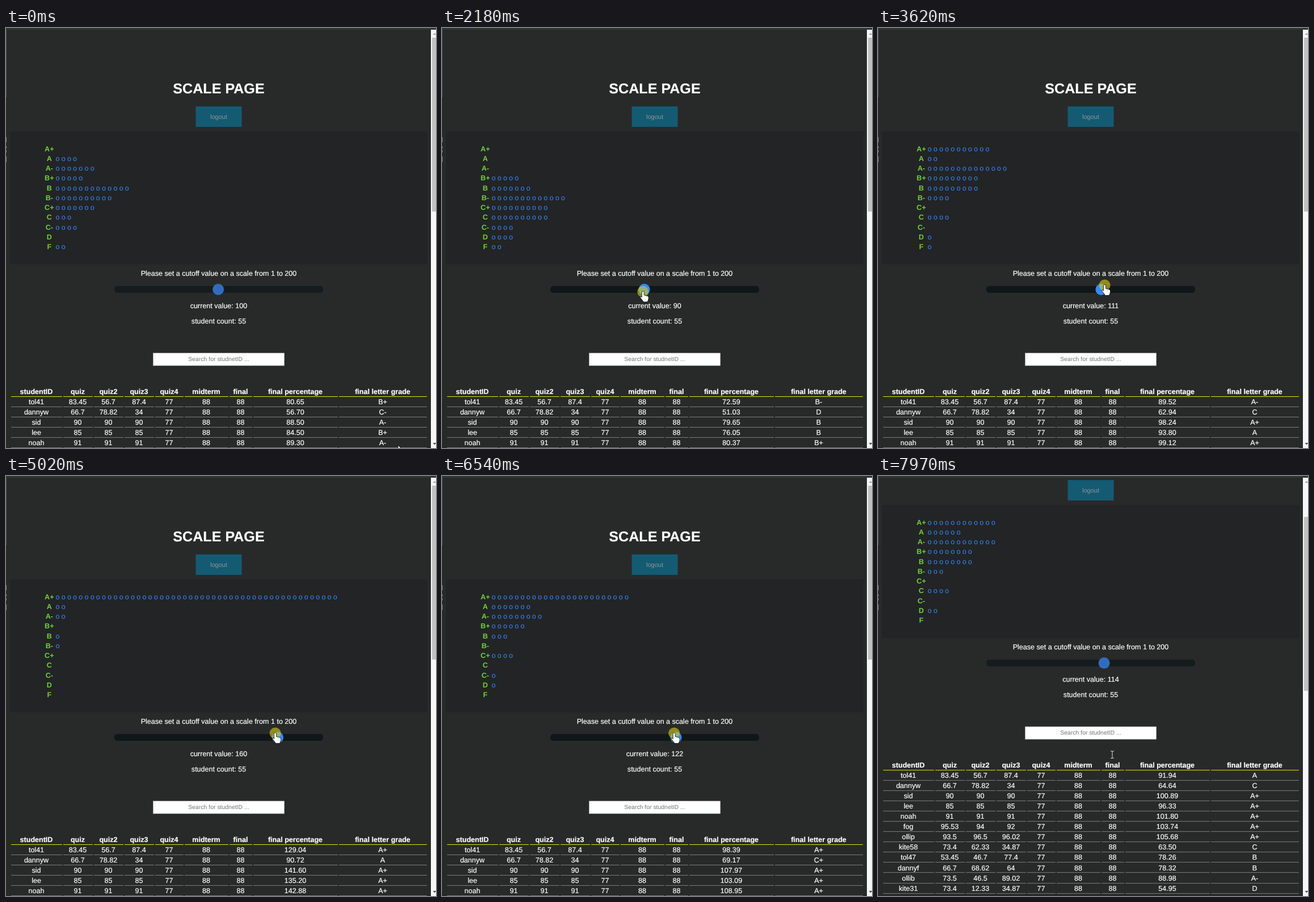
These frames come from a looping animation (758 by 739 pixels, 8 s). An HTML page:

```html
<!DOCTYPE html>
<html lang="en">
<head>
<meta charset="utf-8">
<title>Scale page</title>
<style>
  html, body { margin: 0; height: 100%; overflow: hidden; background: #282a29; }
  svg { display: block; width: 758px; height: 739px; }
  text { font: 12.55px "Liberation Sans", Arial, sans-serif; fill: #fff; stroke: #fff; stroke-width: .2; text-anchor: middle; text-rendering: geometricPrecision; }
  .bold { font-weight: bold; }
  .title { font-weight: bold; font-size: 25.1px; }
  .button { font-size: 11px; fill: #8b9499; stroke: none; }
  .hint { font-size: 10.45px; fill: #757575; stroke: none; }
  .grade { font-weight: bold; fill: #6fd13c; stroke: none; }
  .dots { fill: #3589fb; stroke: none; text-anchor: start; word-spacing: -.27px; }
</style>
</head>
<body>
<svg viewBox="0 0 758 739">
  <g id="page"></g>
  <rect width="758" height="3" fill="#32343a"/>
  <rect y="3" width="1" height="119" fill="#4a5068"/>
  <path d="M.5 192v9m0 7v4m0 3v4m0 7v10" stroke="#85878a"/>
  <rect x="749" y="3" width="9" height="736" fill="#f6f6f6"/>
  <rect id="bar" x="751" width="7" height="306" fill="#c1c1c1"/>
  <path d="M752.5 12l3-3.5 3 3.5z" fill="#a3a3a3"/>
  <path d="M752.5 730l3 3.5 3-3.5z" fill="#505050"/>
  <g id="cursor">
    <circle id="press" r="10" fill="#d7cd14" opacity=".6"/>
    <path id="arrow" d="M0 0V12L2.8 9.5 4.8 14 6.5 13.2 4.6 9H8.5Z" fill="#fff" stroke="#000" stroke-width=".8"/>
    <path id="hand" d="M-2 1Q-2-1 0-1T2 1V6L8 7.5Q10 8 10 10V12Q9.5 16 7.5 18H1Q-1 15-5 10-5 8-3 8.5L-2 10Z" fill="#fff" stroke="#000" stroke-width=".8"/>
    <path id="beam" d="M-3-6H-1L0-5 1-6H3M0-5V6M-3 6.5H-1L0 6 1 6.5H3" fill="none" stroke="#ddd"/>
  </g>
</svg>
<script>
const $ = id => document.getElementById(id);
const LOOP = 8000, ARRIVE = 900, PRESS = 1000, RELEASE = 7020, LEAVE = 7070, SCROLL = 7670;
const STUDENTS = 55;
const GRADES = ['A+', 'A', 'A-', 'B+', 'B', 'B-', 'C+', 'C', 'C-', 'D', 'F'];
const HEADS = ['studentID', 'quiz', 'quiz2', 'quiz3', 'quiz4', 'midterm', 'final', 'final percentage', 'final letter grade'];
const EDGES = [8, 100, 154, 208, 262, 314, 393, 435, 586, 743];

// name, three quizzes, unscaled final
const ROWS = [
  ['tol41', 83.45, 56.7, 87.4, 80.65], ['dannyw', 66.7, 78.82, 34, 56.7],
  ['sid', 90, 90, 90, 88.5], ['lee', 85, 85, 85, 84.5], ['noah', 91, 91, 91, 89.3],
  ['fog', 95.53, 94, 92, 91], ['ollip', 93.5, 96.5, 96.02, 92.7],
  ['kite58', 73.4, 62.33, 34.87, 55.7], ['tol47', 53.45, 46.7, 77.4, 68.65],
  ['dannyf', 66.7, 68.62, 64, 68.7], ['ollib', 73.5, 46.5, 89.02, 78.05],
  ['kite31', 73.4, 12.33, 34.87, 48.2], ['rove8', 83.45, 66.7, 34.87, 63.4]
];
// class rank -> unscaled final
const CURVE = [[0, 93], [4, 89.3], [10, 85.8], [13, 81], [18, 78.8], [24, 77.84], [31, 73.7], [35, 72.15],
  [38, 70.1], [44, 67.7], [46, 64.7], [48, 63.4], [49, 56.7], [52, 55.7], [53, 48.2], [54, 44.5]];
// time -> slider value
const DRAG = [[1100, 100], [2180, 90], [2400, 87], [3620, 111], [5020, 160], [6540, 122], [6950, 114]];

const mix = (a, b, f) => a + (b - a) * Math.max(0, Math.min(1, f));
function along(points, x) {
  const i = points.findIndex(p => p[0] >= x);
  if (i < 1) return points.at(i)[1];
  const [x0, y0] = points[i - 1], [x1, y1] = points[i];
  return mix(y0, y1, (x - x0) / (x1 - x0));
}

const scores = Array.from({ length: STUDENTS }, (_, rank) => along(CURVE, rank));
const gradeOf = p => Math.max(0, Math.min(10, 10 - Math.floor((p - 45) / 5)));
const thumbX = v => 201 + (v - 1) / 199 * 348;

const text = (x, y, str, cls = '', id = '') => `<text x="${x}" y="${y}" class="${cls}" id="${id}">${str}</text>`;
const rect = (x, y, w, h, fill, more = '') => `<rect x="${x}" y="${y}" width="${w}" height="${h}" fill="${fill}" ${more}/>`;
const rule = (y, fill) => HEADS.map((_, i) => rect(EDGES[i] + 1, y, EDGES[i + 1] - EDGES[i] - 2, 1, fill)).join('');
const cell = (col, y, str, cls, id) => text((EDGES[col] + EDGES[col + 1] - 1) / 2, y, str, cls, id);

function build() {
  let out = text(375, 115, 'SCALE PAGE', 'title')
    + rect(334.5, 138, 81, 36, '#155a73') + text(375, 160, 'logout', 'button')
    + rect(7, 182, 736, 234, '#232426');
  GRADES.forEach((g, i) => {
    const y = 216.5 + 17.25 * i;
    out += text(76.3, y, g, 'grade') + text(87.5, y, '', 'dots', 'dots' + i);
  });
  out += text(375, 435.5, 'Please set a cutoff value on a scale from 1 to 200')
    + '<g id="slider">' + rect(191, 454, 368, 12, '#0f1719', 'rx="5"')
    + '<circle id="thumb" cy="460" r="10" fill="#3589fb"/></g>'
    + text(375, 492.8, '', '', 'value') + text(375, 519.5, 'student count: ' + STUDENTS)
    + rect(259.5, 572, 231, 22, '#fff', 'stroke="#ccc" stroke-width=".6"')
    + text(375, 586.3, 'Search for studnetID ...', 'hint')
    + HEADS.map((h, i) => cell(i, 643.8, h, 'bold')).join('') + rule(648, '#e2e200');
  ROWS.forEach(([name, a, b, c], r) => {
    const y = 662 + 18.05 * r;
    [name, a, b, c, 77, 88, 88].forEach((v, i) => out += cell(i, y, v));
    out += cell(7, y, '', '', 'pct' + r) + cell(8, y, '', '', 'letter' + r)
      + rule(Math.round(y + 4), '#7b7c7b');
  });
  $('page').innerHTML = out;
}

let shown;
function showValue(v) {
  if (v === shown) return;
  shown = v;
  const scaled = s => s * v / 100 + 1e-6;
  const counts = GRADES.map(() => 0);
  scores.forEach(s => counts[gradeOf(scaled(s))]++);
  counts.forEach((n, i) => $('dots' + i).textContent = 'o '.repeat(n));
  ROWS.forEach((row, r) => {
    const p = scaled(row[4]);
    $('pct' + r).textContent = p.toFixed(2);
    $('letter' + r).textContent = GRADES[gradeOf(p)];
  });
  $('value').textContent = 'current value: ' + v;
  $('thumb').setAttribute('cx', thumbX(v));
}

// While dragging, the pointer runs slightly ahead of the thumb.
function pointer(t) {
  const arrive = (t - 100) / (ARRIVE - 100), leave = (t - LEAVE) / 300;
  const x = thumbX(along(DRAG, t + 100));
  const y = mix(464, 452.5, (t - 2180) / 1440);
  return t < ARRIVE ? [mix(691, x, arrive), mix(734, y, arrive)] : [mix(x, 413, leave), mix(y, 490, leave)];
}

const show = (id, on) => $(id).setAttribute('visibility', on ? 'visible' : 'hidden');

function draw() {
  const t = performance.now() % LOOP;
  const hover = t >= ARRIVE && t < LEAVE + 100;
  showValue(Math.round(along(DRAG, t)));
  $('slider').setAttribute('opacity', hover ? 1 : .7);
  $('cursor').setAttribute('transform', `translate(${pointer(t)})`);
  show('arrow', t < ARRIVE);
  show('hand', hover);
  show('beam', t > ARRIVE && !hover);
  show('press', t >= PRESS && t < RELEASE);

  const scroll = t < SCROLL ? 0 : 19.6 + 37.1 * Math.floor((t - SCROLL) / 100);
  $('page').setAttribute('transform', `translate(0 ${-scroll})`);
  $('bar').setAttribute('y', 17 + .42 * scroll);
  requestAnimationFrame(draw);
}

build();
draw();
</script>
</body>
</html>
```
